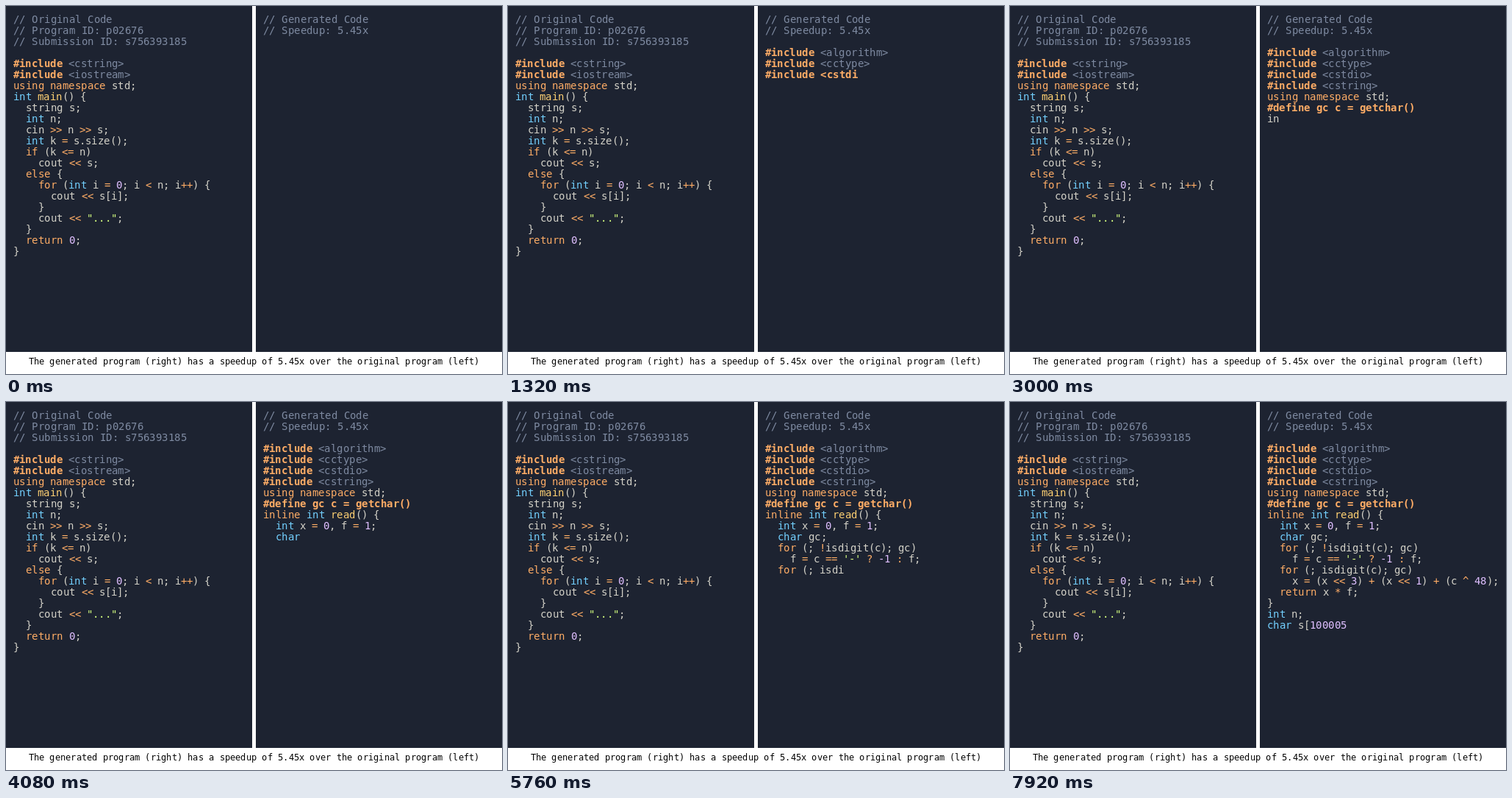
Recreate the animation shown at these times as an HTML page with a canvas. Size 675 by 500 pixels, loop 8000 ms.

```html
<!DOCTYPE html>
<html lang="en">
<head>
<meta charset="utf-8">
<title>Generated program typing</title>
<style>
  html, body { margin: 0; width: 100%; height: 100%; overflow: hidden; background: #fff; }
  canvas { display: block; }
</style>
</head>
<body>
<canvas id="stage" width="675" height="500"></canvas>
<script>
const LOOP = 8000, STEP = 120, CHARS_PER_STEP = 5;
const LINE_HEIGHT = 15, ADVANCE = 0.60205;
const COLOR = {
  panel: '#1d2331', text: '#d4d2c8', comment: '#7e8aa1', keyword: '#ffad66', type: '#73d0ff',
  name: '#ffd173', string: '#d5ff80', number: '#dfbfff', error: '#f88f7f'
};

const remarks = (...lines) => lines.map(line => '/'.repeat(2) + ' ' + line + '\n').join('');

const LEFT_HEADER = remarks('Original Code', 'Program ID: p02676', 'Submission ID: s756393185');
const LEFT_CODE = `
#include <cstring>
#include <iostream>
using namespace std;
int main() {
  string s;
  int n;
  cin >> n >> s;
  int k = s.size();
  if (k <= n)
    cout << s;
  else {
    for (int i = 0; i < n; i++) {
      cout << s[i];
    }
    cout << "...";
  }
  return 0;
}`;

const RIGHT_HEADER = remarks('Generated Code', 'Speedup: 5.45x');
const RIGHT_CODE = `
#include <algorithm>
#include <cctype>
#include <cstdio>
#include <cstring>
using namespace std;
#define gc c = getchar()
inline int read() {
  int x = 0, f = 1;
  char gc;
  for (; !isdigit(c); gc)
    f = c == '-' ? -1 : f;
  for (; isdigit(c); gc)
    x = (x << 3) + (x << 1) + (c ^ 48);
  return x * f;
}
int n;
char s[100005`;

const CAPTION = 'The generated program (right) has a speedup of 5.45x over the original program (left)';

// First matching rule wins: pattern, colour, bold
const RULES = [
  [/\/{2}.*/y, COLOR.comment],
  [/#|(?<=#)include(?= <\w+>)/y, COLOR.keyword, true],
  [/(?<=#).+/y, COLOR.keyword, true],
  [/<\w+>/y, COLOR.comment],
  [/"[^"]*"|'[^']'/y, COLOR.string],
  [/["']/y, COLOR.error],
  [/-?\d+/y, COLOR.number],
  [/\w+(?=\(\) \{)/y, COLOR.name],
  [/(int|char)\b/y, COLOR.type],
  [/(using|namespace|inline|if|else|for|return)\b/y, COLOR.keyword],
  [/[!^*+=?:<>-]/y, COLOR.keyword],
  [/ +|\w+|./y, COLOR.text]
];

const ctx = document.getElementById('stage').getContext('2d');

function drawText(text, x, y, size, color, bold) {
  ctx.font = `${bold ? 'bold ' : ''}${size}px "DejaVu Sans Mono", monospace`;
  ctx.fillStyle = color;
  const cell = size * ADVANCE;
  [...text].forEach((char, i) => ctx.fillText(char, Math.round(x + i * cell), y));
  return x + Math.round(text.length * cell);
}

function drawLine(line, x, y) {
  let pos = 0;
  while (pos < line.length) {
    for (const [pattern, color, bold] of RULES) {
      pattern.lastIndex = pos;
      const match = pattern.exec(line);
      if (!match) continue;
      // Quotes are tokens of their own
      for (const part of match[0].split(/(?=["'])|(?<=["'])/)) {
        x = drawText(part, x, y, 14, color, bold);
      }
      pos += match[0].length;
      break;
    }
  }
}

function drawPanel(code, left) {
  ctx.fillStyle = COLOR.panel;
  ctx.fillRect(left, 0, 335, 470);
  code.split('\n').forEach((line, i) => drawLine(line, left + 10, 23 + i * LINE_HEIGHT));
}

let shown = -1;
function frame(now) {
  const step = Math.floor((now % LOOP) / STEP);
  if (step !== shown) {
    shown = step;
    ctx.fillStyle = '#fff';
    ctx.fillRect(0, 0, 675, 500);
    drawPanel(LEFT_HEADER + LEFT_CODE, 0);
    drawPanel(RIGHT_HEADER + RIGHT_CODE.slice(0, step * CHARS_PER_STEP), 340);
    drawText(CAPTION, 30.5, 487, 12, '#000');
  }
  requestAnimationFrame(frame);
}
frame(0);
</script>
</body>
</html>
```
